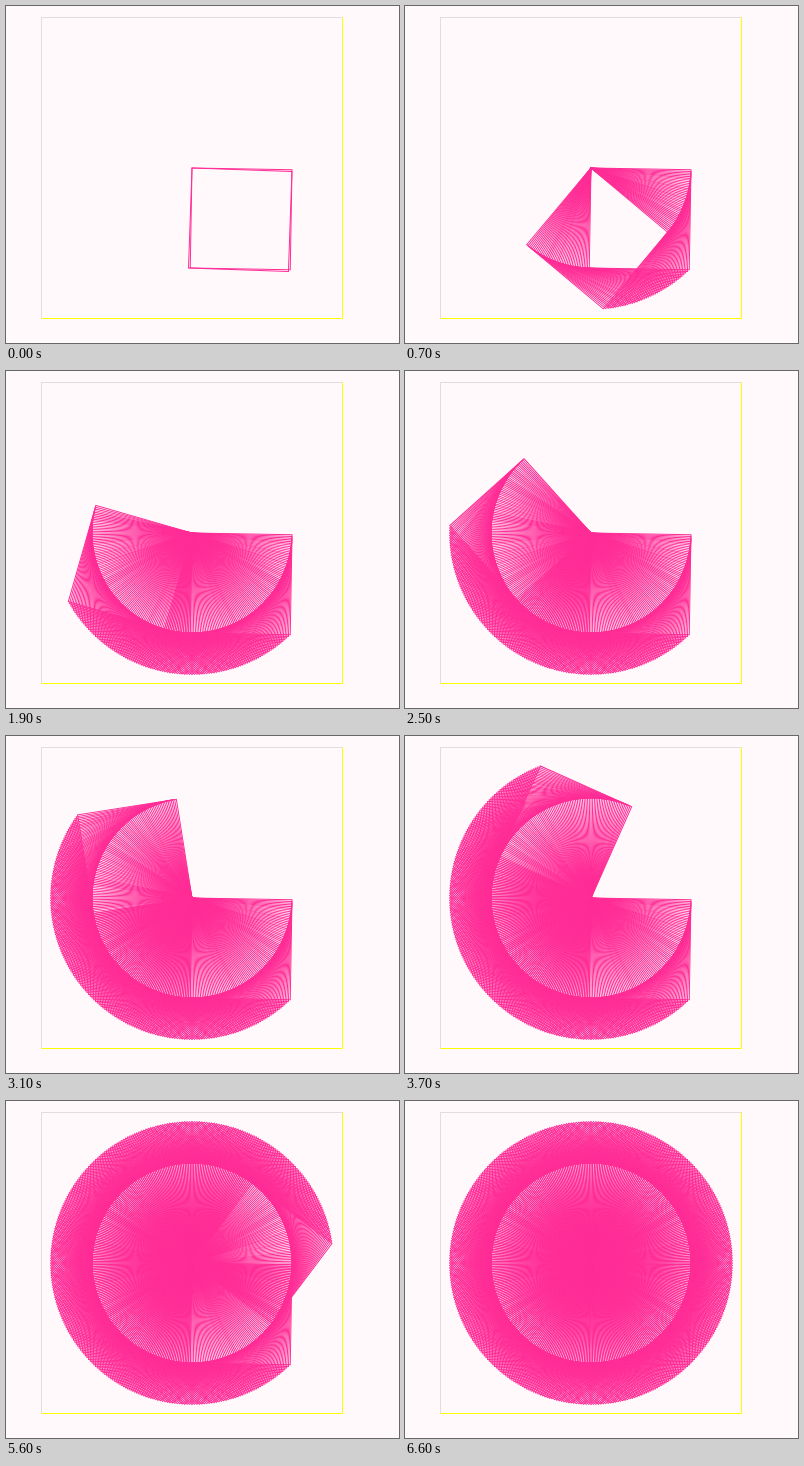
Recreate the animation shown at these times as an HTML page with a canvas. Size 393 by 337 pixels, loop 7.8 s.

```html
<!DOCTYPE html>
<html lang="en">
<head>
<meta charset="utf-8">
<title>Rotating squares</title>
<style>
  html, body {
    margin: 0;
    width: 100%;
    height: 100%;
    overflow: hidden;
    background: #fff9fb;
  }
  canvas {
    position: absolute;
    left: 35px;
    top: 11px;
    border: 1px solid;
    border-color: #e0dede #ff0 #ff0 #e0dede;
  }
</style>
</head>
<body>
<canvas id="stage" width="300" height="300"></canvas>
<script>
  const LOOP = 7800, TICK = 100, LAST_TICK = 66;
  const SIDE = 100, MAX_TURN = 361;
  const ctx = document.getElementById('stage').getContext('2d');
  let drawn = 0;

  // Number of one-degree turns finished at a time within the loop.
  function turnsAt(ms) {
    const tick = Math.min(LAST_TICK, Math.floor(ms / TICK));
    return Math.min(MAX_TURN, Math.round(2 + tick * 60 / 11));
  }

  function drawSquare(deg) {
    ctx.setTransform(1, 0, 0, 1, 150, 150);
    ctx.rotate(deg * Math.PI / 180);
    ctx.strokeRect(0, 0, SIDE, SIDE);
  }

  function clear() {
    ctx.setTransform(1, 0, 0, 1, 0, 0);
    ctx.clearRect(0, 0, 300, 300);
    drawn = 0;
  }

  function render(ms) {
    const turns = turnsAt(ms);
    if (turns < drawn) clear();
    while (drawn < turns) drawSquare(++drawn);
  }

  ctx.strokeStyle = '#ff2d96';
  ctx.lineWidth = 1;

  const start = performance.now();
  function loop() {
    render((performance.now() - start) % LOOP);
    requestAnimationFrame(loop);
  }
  loop();
</script>
</body>
</html>
```
